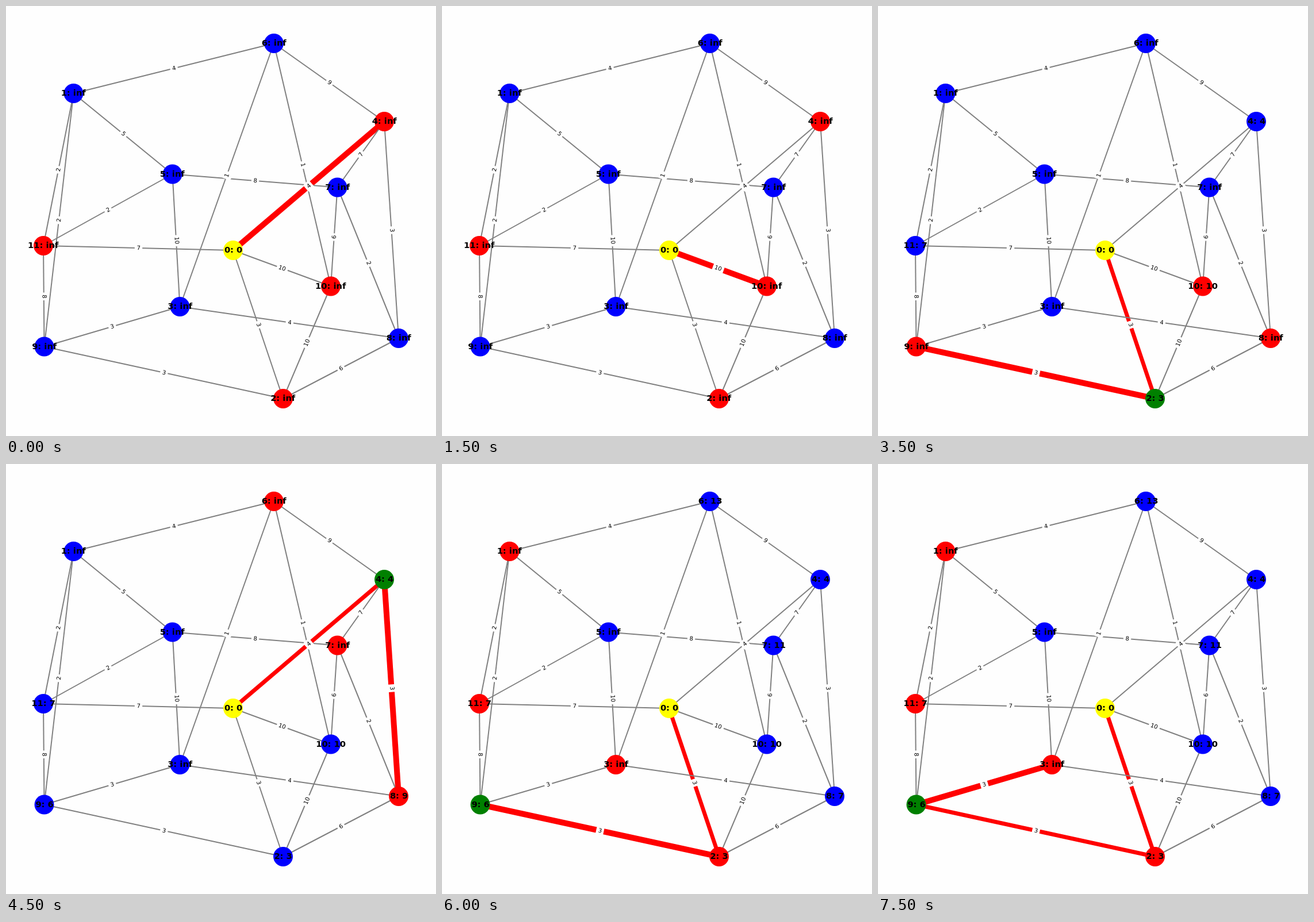
These frames come from a looping animation (748x748 px, 8 s). An HTML page with a canvas:

```html
<!DOCTYPE html>
<html>
<head>
<meta charset="utf-8">
<style>
html, body { margin: 0; width: 100%; height: 100%; overflow: hidden; background: #fefefe; }
canvas { display: block; }
</style>
</head>
<body>
<canvas id="stage" width="748" height="748"></canvas>
<script>
const ctx = document.getElementById('stage').getContext('2d');
const STEP = 500, VISITS = 4;
const PAPER = '#fefefe', GRAY = '#808080', RED = '#ff0000';
const BLUE = '#0000ff', GREEN = '#008000', YELLOW = '#ffff00';

// Node centres, by node number
const nodes = ('395,425 117.5,152 482,683 302.5,523 658,201 289.5,292.5 ' +
  '466,65 576.5,315.5 683,578 66.5,592.5 565,487.5 65,417')
  .split(' ').map(p => p.split(',').map(Number));

// from-to:weight; the order sets the order in which neighbours are inspected
const edges = ('4-6:9 4-8:3 0-4:4 0-2:3 2-8:6 2-10:10 2-9:3 1-9:2 9-11:8 3-9:3 0-11:7 0-10:10 ' +
  '4-7:7 1-11:2 1-6:4 1-5:5 3-8:4 3-6:1 3-5:10 5-7:8 5-11:2 6-10:1 7-10:6 7-8:2')
  .split(' ').map(s => s.split(/[-:]/).map(Number));
const drawOrder = [...edges].sort((p, q) => p[0] - q[0]);

const joins = (a, b, c, d) => (a === c && b === d) || (a === d && b === c);

// Dijkstra from node 0: one step for each neighbour inspected
function search() {
  const dist = nodes.map((_, n) => n ? Infinity : 0);
  const prev = [], done = new Set(), steps = [];
  for (let i = 0; i < VISITS; i++) {
    const at = nodes.map((_, n) => n).filter(n => !done.has(n))
      .reduce((best, n) => dist[n] < dist[best] ? n : best);
    done.add(at);
    const path = [at];
    while (path[0] !== 0) path.unshift(prev[path[0]]);
    const links = edges.filter(e => e[0] === at || e[1] === at)
      .map(([a, b, w]) => ({ to: a === at ? b : a, w }));
    const next = links.map(l => l.to), known = [...dist];
    for (const { to, w } of links) {
      steps.push({ at, to, next, path, dist: known });
      if (dist[at] + w < dist[to]) {
        dist[to] = dist[at] + w;
        prev[to] = at;
      }
    }
  }
  return steps;
}
const steps = search();

// Centres the inked part of the text on x
function centredText(text, x, y) {
  const m = ctx.measureText(text);
  ctx.fillText(text, x - (m.actualBoundingBoxRight - m.actualBoundingBoxLeft) / 2, y);
}

function drawEdge([a, b], { at, to, path }) {
  const active = joins(a, b, at, to);
  const used = path.some((n, i) => i > 0 && joins(a, b, path[i - 1], n));
  ctx.strokeStyle = active || used ? RED : GRAY;
  ctx.lineWidth = active ? 10 : used ? 7 : 2;
  ctx.beginPath();
  ctx.moveTo(...nodes[a]);
  ctx.lineTo(...nodes[b]);
  ctx.stroke();
}

function drawWeight([a, b, weight]) {
  const [x1, y1] = nodes[a], [x2, y2] = nodes[b];
  let angle = Math.atan2(y2 - y1, x2 - x1);
  if (angle > Math.PI / 2) angle -= Math.PI;
  if (angle < -Math.PI / 2) angle += Math.PI;
  ctx.save();
  ctx.translate((x1 + x2) / 2 + 0.5, (y1 + y2) / 2 + 0.5);
  ctx.rotate(angle);
  ctx.font = '10px "DejaVu Sans", sans-serif';
  const w = ctx.measureText(weight).width + 7, h = 16.6;
  ctx.fillStyle = PAPER;
  ctx.beginPath();
  ctx.roundRect(-w / 2, -h / 2, w, h, 3.5);
  ctx.fill();
  ctx.fillStyle = '#000';
  centredText(weight, 0, 2.6);
  ctx.restore();
}

function nodeColor(n, { at, next }) {
  if (n === 0) return YELLOW;
  if (n === at) return GREEN;
  return next.includes(n) ? RED : BLUE;
}

function draw(step) {
  ctx.fillStyle = PAPER;
  ctx.fillRect(0, 0, 748, 748);
  drawOrder.forEach(e => drawEdge(e, step));
  drawOrder.forEach(drawWeight);
  nodes.forEach(([x, y], n) => {
    ctx.fillStyle = nodeColor(n, step);
    ctx.beginPath();
    ctx.arc(x, y, 17, 0, Math.PI * 2);
    ctx.fill();
  });
  ctx.font = 'bold 14.7px "DejaVu Sans", sans-serif';
  ctx.fillStyle = '#000';
  nodes.forEach(([x, y], n) => {
    const d = step.dist[n];
    centredText(`${n}: ${d < Infinity ? d : 'inf'}`, x + 0.5, Math.round(y + 4));
  });
}

const start = performance.now();
function tick() {
  const t = Math.max(0, performance.now() - start);
  draw(steps[Math.floor(t / STEP) % steps.length]);
  requestAnimationFrame(tick);
}
tick();
</script>
</body>
</html>
```
